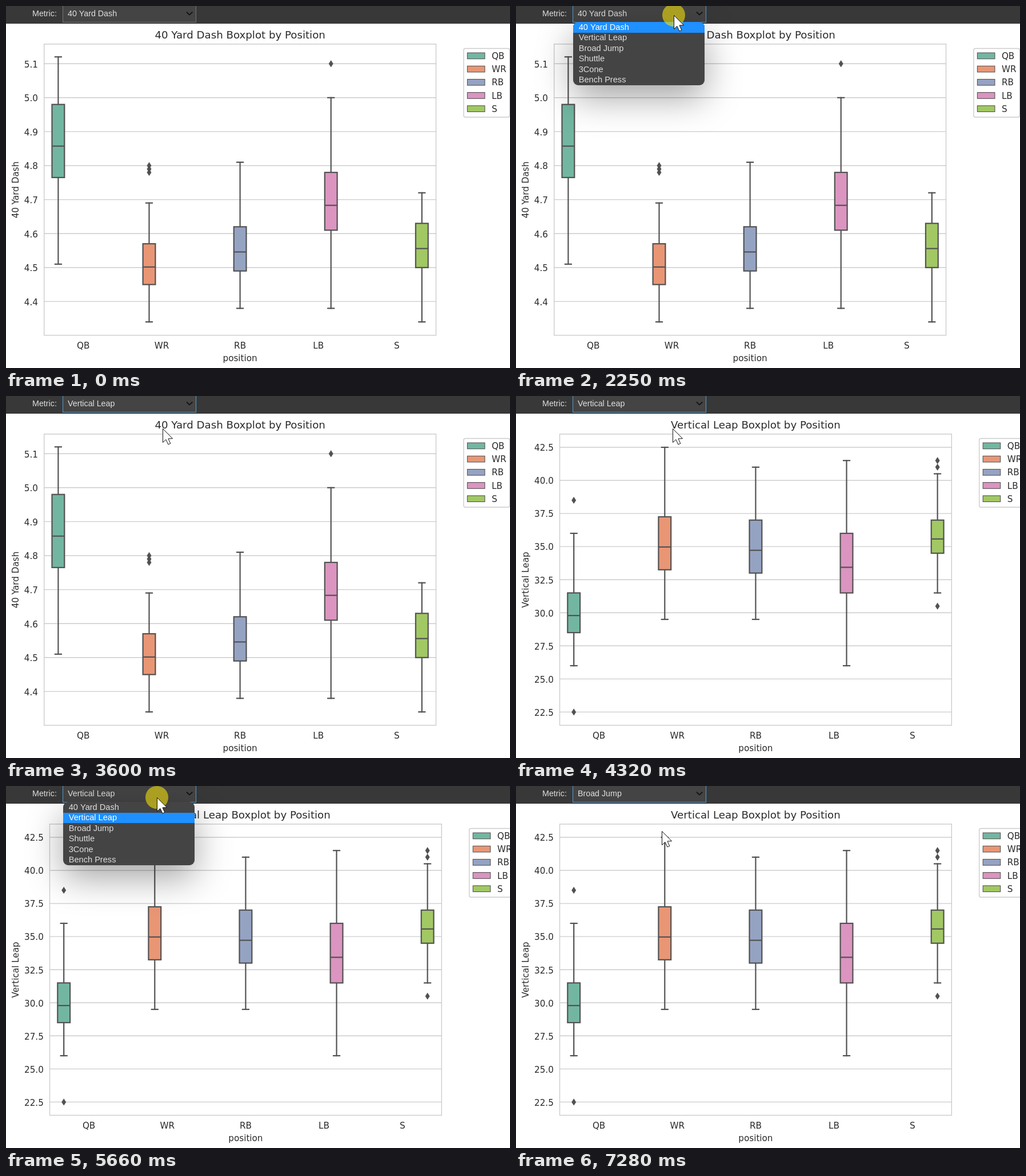
Animation, 882 px wide and 635 px high, one loop 8 s. Source, as an HTML page with a canvas:

```html
<!DOCTYPE html>
<html lang="en">
<head>
<meta charset="utf-8">
<title>Boxplot by position</title>
<style>
  html, body { margin: 0; width: 100%; height: 100%; overflow: hidden; background: #fff; }
  canvas { display: block; }
</style>
</head>
<body>
<canvas id="stage" width="882" height="635"></canvas>
<script>
const ctx = document.getElementById('stage').getContext('2d');
const LOOP = 8000, TICK = 67;
const SANS = '"Liberation Sans", Arial, sans-serif';
const PLOT = '"DejaVu Sans", sans-serif';
const GRID = '#cccccc', INK = '#2b2b2b', LINE = '#525252';

const METRICS = ['40 Yard Dash', 'Vertical Leap', 'Broad Jump', 'Shuttle', '3Cone', 'Bench Press'];
const POSITIONS = ['QB', 'WR', 'RB', 'LB', 'S'];
const COLORS = ['#72b6a1', '#e99675', '#95a3c3', '#db95c0', '#a2c864'];

// A box is its low whisker, quartiles, high whisker and any outliers;
// the samples lean low, so the median sits a little under the middle.
const MEDIAN = 0.43;
const DASH = {
  title: METRICS[0], left: 66.7, top: 5.1, topY: 101.2, unit: 596, step: 0.1, ticks: 8,
  boxes: [
    [4.51, 4.765, 4.98, 5.12],
    [4.34, 4.45, 4.57, 4.69, 4.78, 4.79, 4.8],
    [4.38, 4.49, 4.62, 4.81],
    [4.38, 4.61, 4.78, 5, 5.1],
    [4.34, 4.5, 4.63, 4.72],
  ],
};
const LEAP = {
  title: METRICS[1], left: 76.5, top: 42.5, topY: 90, unit: 23.22, step: 2.5, ticks: 9,
  boxes: [
    [26, 28.5, 31.5, 36, 22.5, 38.5],
    [29.5, 33.25, 37.25, 42.5],
    [29.5, 33, 37, 41],
    [26, 31.5, 36, 41.5],
    [31.5, 34.5, 37, 40.5, 30.5, 41, 41.5],
  ],
};

// The pointer enters from beyond the corner and eases from place to place.
const ENTRY = { x: 945, y: 745 };
const MOVES = [
  { start: 400, end: 880, x: 389, y: 167 },
  { start: 1160, end: 1430, x: 312, y: 84 },
  { start: 1500, end: 1890, x: 276, y: 16 },
  { start: 2630, end: 2980, x: 274, y: 57 },
  { start: 4910, end: 5110, x: 264, y: 20 },
  { start: 6190, end: 6610, x: 255, y: 79 },
];
// Each visit to the menu selects the metric after the current one.
const VISITS = [
  { press: 2170, hover: 2840, pick: 3330, close: 3600 },
  { press: 5590, hover: 6400, pick: 7060, close: 7280 },
];
const OPEN_DELAY = 70, PRESS_TIME = 3 * TICK, REDRAWN = 4320;

const within = (t, from, to) => t >= from && t < to;
const easeOut = p => 1 - (1 - p) ** 2.5;

function text(str, x, y, size, family, color, align = 'left') {
  ctx.font = `${size}px ${family}`;
  ctx.fillStyle = color;
  ctx.textAlign = align;
  ctx.fillText(str, x, y);
}

function rect(x, y, w, h, fill, stroke, width = 1) {
  if (fill) { ctx.fillStyle = fill; ctx.fillRect(x, y, w, h); }
  if (stroke) { ctx.strokeStyle = stroke; ctx.lineWidth = width; ctx.strokeRect(x, y, w, h); }
}

function line(x1, y1, x2, y2, color, width) {
  ctx.strokeStyle = color;
  ctx.lineWidth = width;
  ctx.beginPath();
  ctx.moveTo(x1, y1);
  ctx.lineTo(x2, y2);
  ctx.stroke();
}

function polygon(points) {
  ctx.beginPath();
  points.forEach(([x, y]) => ctx.lineTo(x, y));
  ctx.closePath();
}

function drawBox(x, values, color, yOf) {
  const [low, q1, q3, high, ...outliers] = values.map(yOf);
  const median = q1 + (q3 - q1) * MEDIAN;
  const half = 10.9, cap = 5.5, w = 2.2;
  ctx.lineCap = 'square';
  for (const [end, edge] of [[low, q1], [high, q3]]) {
    line(x, end, x, edge, LINE, w);
    line(x - cap, end, x + cap, end, LINE, w);
  }
  ctx.lineCap = 'butt';
  rect(x - half, q3, half * 2, q1 - q3, color, LINE, w);
  line(x - half, median, x + half, median, LINE, w);
  ctx.fillStyle = LINE;
  for (const y of outliers) {
    polygon([[x, y - 6.2], [x + 4, y], [x, y + 6.2], [x - 4, y]]);
    ctx.fill();
  }
}

function drawLegend(x) {
  ctx.beginPath();
  ctx.roundRect(x, 74.5, 80.5, 120.5, 3);
  ctx.strokeStyle = GRID;
  ctx.lineWidth = 1.4;
  ctx.stroke();
  POSITIONS.forEach((name, i) => {
    const y = 87.4 + i * 23.2;
    rect(x + 6.5, y - 5.3, 30.5, 10.6, COLORS[i], LINE, 1.1);
    text(name, x + 49, y + 5.6, 15.2, PLOT, INK);
  });
}

function drawChart(chart) {
  const { left } = chart, width = 685.8, top = 66.8, height = 510.8;
  const slot = width / 5, dodge = slot * 0.16, middle = left + width / 2;
  const yOf = v => chart.topY + (chart.top - v) * chart.unit;

  for (let i = 0; i < chart.ticks; i++) {
    const value = chart.top - i * chart.step, y = yOf(value);
    line(left, y, left + width, y, GRID, 1.4);
    text(value.toFixed(1), left - 10.7, y + 6.3, 15.2, PLOT, INK, 'right');
  }
  rect(left, top, width, height, null, GRID, 1.4);

  chart.boxes.forEach((values, i) => {
    const x = left + slot * (i + 0.5);
    drawBox(x + (i - 2) * dodge, values, COLORS[i], yOf);
    text(POSITIONS[i], x, 601, 15.2, PLOT, INK, 'center');
  });

  text(`${chart.title} Boxplot by Position`, middle, 57, 18.2, PLOT, INK, 'center');
  text('position', middle, 622.5, 15.2, PLOT, INK, 'center');
  ctx.save();
  ctx.translate(21.5, 322.5);
  ctx.rotate(-Math.PI / 2);
  text(chart.title, 0, 0, 15.2, PLOT, INK, 'center');
  ctx.restore();
  drawLegend(left + 734.2);
}

function drawToolbar(metric, focused) {
  rect(0, 0, 882, 31, '#383838');
  text('Metric:', 46, 18, 14.3, SANS, '#dddddd');
  rect(99.5, -5.5, 233, 34, '#444444', focused ? '#5a9bc8' : '#757575');
  text(METRICS[metric], 108, 18, 14.25, SANS, '#e0e0e0');
  line(316, 10.5, 321.2, 15.8, '#161616', 2);
  line(320.6, 15.8, 326.4, 10.5, '#161616', 2);
}

function drawMenu(hovered) {
  const x = 100, w = 230, row = 18.4;
  const rowTop = i => Math.round(28.4 + i * row);
  ctx.save();
  ctx.beginPath();
  ctx.roundRect(x, rowTop(0), w, rowTop(METRICS.length) - rowTop(0), 9);
  ctx.fillStyle = '#444444';
  ctx.shadowColor = 'rgba(0,0,0,.36)';
  ctx.shadowBlur = 62;
  ctx.shadowOffsetY = 22;
  ctx.fill();
  ctx.shadowColor = 'transparent';
  ctx.clip();
  rect(x, rowTop(hovered), w, rowTop(hovered + 1) - rowTop(hovered), '#1e90ff');
  ctx.restore();
  METRICS.forEach((name, i) =>
    text(name, 109.7, 42 + i * row, 14.6, SANS, i === hovered ? '#ffffff' : '#dedede'));
}

function pointerAt(t) {
  let { x, y } = ENTRY;
  for (const move of MOVES) {
    if (t < move.start) break;
    const steps = Math.round((move.end - move.start) / TICK) + 1;
    const step = Math.floor((t - move.start) / TICK) + 1;
    const eased = easeOut(Math.min(1, step / steps));
    x += (move.x - x) * eased;
    y += (move.y - y) * eased;
  }
  return [x, y];
}

function drawPointer(x, y, pressed) {
  if (pressed) {
    ctx.beginPath();
    ctx.arc(x, y, 20, 0, Math.PI * 2);
    ctx.fillStyle = 'rgba(246,228,10,.58)';
    ctx.fill();
  }
  ctx.save();
  ctx.translate(x + 0.5, y + 0.5);
  polygon([[0, 0], [0, 24], [5.4, 18.9], [9.4, 27.5], [13.3, 25.8], [9.5, 17.4], [17, 17.2]]);
  ctx.fillStyle = '#ffffff';
  ctx.fill();
  ctx.strokeStyle = '#111111';
  ctx.lineWidth = 1;
  ctx.stroke();
  ctx.restore();
}

function draw(t) {
  rect(0, 0, 882, 635, '#ffffff');
  drawChart(t < REDRAWN ? DASH : LEAP);
  const selected = VISITS.filter(visit => t >= visit.close).length;
  drawToolbar(selected, t >= VISITS[0].press);

  const visit = VISITS.find(v => within(t, v.press, v.close));
  if (visit && t >= visit.press + OPEN_DELAY) {
    drawMenu(t < visit.hover ? selected : selected + 1);
  }
  if (t >= MOVES[0].start) {
    const pressed = visit && (t < visit.press + PRESS_TIME || t >= visit.pick);
    drawPointer(...pointerAt(t), pressed);
  }
}

const begun = performance.now();
function tick() {
  draw((performance.now() - begun) % LOOP);
  requestAnimationFrame(tick);
}
tick();
</script>
</body>
</html>
```
